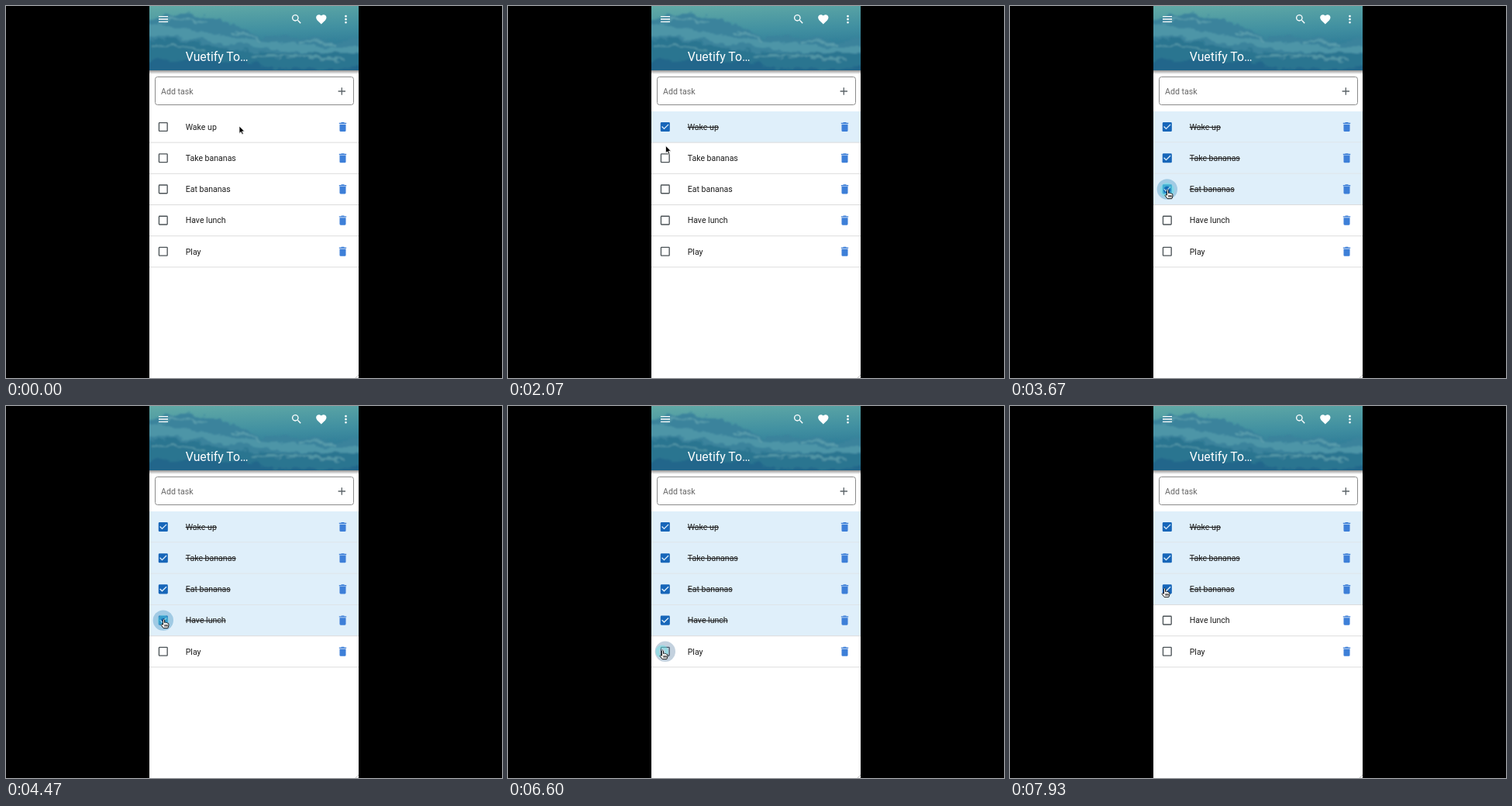
Recreate the animation shown at these times as an HTML page. Size 640 by 480 pixels, loop 8 s.

```html
<!DOCTYPE html>
<html lang="en">
<head>
<meta charset="utf-8">
<title>Todo list</title>
<style>
html, body { margin: 0; width: 100%; height: 100%; overflow: hidden; background: #000; }
svg { display: block; width: 100vw; height: 100vh; }
text { font-family: Roboto, Arial, sans-serif; }
</style>
</head>
<body>
<svg viewBox="0 0 640 480">
  <defs>
    <linearGradient id="sky" x1="0" y1="0" x2="0.15" y2="1">
      <stop offset="0" stop-color="#62aaa6"/>
      <stop offset=".45" stop-color="#4190a1"/>
      <stop offset="1" stop-color="#216a8f"/>
    </linearGradient>
    <linearGradient id="drop" x1="0" y1="0" x2="0" y2="1">
      <stop offset="0" stop-color="#000" stop-opacity=".42"/>
      <stop offset="1" stop-color="#000" stop-opacity="0"/>
    </linearGradient>
    <filter id="cloud" x="-10%" y="-30%" width="120%" height="160%">
      <feTurbulence type="fractalNoise" baseFrequency=".05 .09" numOctaves="3" seed="7"/>
      <feDisplacementMap in="SourceGraphic" scale="14" xChannelSelector="R" yChannelSelector="G"/>
      <feGaussianBlur stdDeviation="1.1"/>
    </filter>
    <clipPath id="head"><rect x="185" width="270" height="83"/></clipPath>
    <clipPath id="page"><rect x="185" width="270" height="480"/></clipPath>
  </defs>
  <rect width="640" height="480"/>
  <rect x="185" width="270" height="480" fill="#fff"/>
  <rect x="185" y="83" width="270" height="5" fill="url(#drop)"/>
  <g clip-path="url(#head)">
    <rect x="185" width="270" height="83" fill="url(#sky)"/>
    <g filter="url(#cloud)">
      <path d="M170 22Q200 8 216 15Q232 4 248 14Q272 10 288 24Q312 28 330 42Q352 36 372 44Q400 34 422 46L470 42V100H170Z" fill="#3a839c"/>
      <path d="M170 30Q205 21 232 29T300 41T352 47T410 52T470 50V60Q400 64 340 55T240 42T170 40Z" fill="#5a9fae" opacity=".65"/>
      <path d="M170 46Q210 38 252 48T340 60T470 62V100H170Z" fill="#28728f" opacity=".85"/>
      <path d="M196 23Q222 14 258 21M292 33Q316 36 330 45M378 48Q402 40 428 50M190 53Q225 48 256 57M318 66Q366 60 440 70" fill="none" stroke="#79b4ba" stroke-width="2.5" opacity=".5"/>
      <path d="M170 74Q240 62 320 76T470 74V100H170Z" fill="#1c6289" opacity=".7"/>
    </g>
  </g>
  <text x="231.8" y="70.6" font-size="15.8" fill="#fff">Vuetify To…</text>
  <g id="bar" fill="#fff"></g>
  <rect id="field" x="192.5" y="91.5" width="256" height="36" rx="3" fill="none"/>
  <rect id="notch" x="198" y="90" height="4" fill="#fff"/>
  <text id="label">Add task</text>
  <rect id="caret" x="200" y="103.5" width="1" height="13" fill="#1867a8"/>
  <g id="plus"></g>
  <g id="list" clip-path="url(#page)"></g>
  <g clip-path="url(#page)">
    <circle id="ripple" cx="202.8" r="13.2"/>
    <circle id="ring" fill="none" stroke="#68e4e8" stroke-width="4.6"/>
  </g>
  <path d="M451 480L455 476M453.5 480L455 478.5" stroke="#aaa" stroke-width=".7"/>
  <g id="pointer">
    <path id="arrow" d="M0 0V9.4L2.2 7.4L3.7 10.8L5.3 10.1L3.8 6.8H6.8Z" fill="#000" stroke="#fff" stroke-width=".7"/>
    <path id="hand" d="M-1 1Q0-.9 1 1V4.6Q2.2 3.5 2.9 4.8Q4.2 4 4.8 5.3Q6.4 4.8 6.4 6.6V8.6L5.3 11.6H-.4L-3.4 7.6Q-3.2 5.7-1 7.2ZM1.3 7V9.8M3 7V9.8M4.7 7V9.8" fill="#fff" stroke="#000" stroke-width=".9" stroke-linejoin="round"/>
    <path id="beam" d="M-2-5Q0-5 0-4Q0-5 2-5M0-4V5M-2 6Q0 6 0 5Q0 6 2 6" fill="none" stroke="#222" stroke-width=".9"/>
  </g>
</svg>
<script>
const LOOP = 8000;
const $ = id => document.getElementById(id);
const ICON = {
  menu: "M3 6H21V8H3ZM3 11H21V13H3ZM3 16H21V18H3Z",
  search: "M9.5 3A6.5 6.5 0 0 1 16 9.5C16 11.1 15.4 12.6 14.4 13.7L14.7 14H15.5L20.5 19L19 20.5L14 15.5V14.7L13.7 14.4A6.5 6.5 0 1 1 9.5 3M9.5 5A4.5 4.5 0 1 0 9.5 14A4.5 4.5 0 1 0 9.5 5",
  heart: "M12 21.3L10.6 20C5.4 15.4 2 12.3 2 8.5C2 5.4 4.4 3 7.5 3C9.2 3 10.9 3.8 12 5.1C13.1 3.8 14.8 3 16.5 3C19.6 3 22 5.4 22 8.5C22 12.3 18.6 15.4 13.4 20Z",
  dots: "M12 4A2 2 0 0 1 12 8A2 2 0 0 1 12 4M12 10A2 2 0 0 1 12 14A2 2 0 0 1 12 10M12 16A2 2 0 0 1 12 20A2 2 0 0 1 12 16",
  plus: "M19 13H13V19H11V13H5V11H11V5H13V11H19Z",
  trash: "M19 4H15.5L14.5 3H9.5L8.5 4H5V6H19ZM6 19A2 2 0 0 0 8 21H16A2 2 0 0 0 18 19V7H6Z",
  box: "M19 3H5A2 2 0 0 0 3 5V19A2 2 0 0 0 5 21H19A2 2 0 0 0 21 19V5A2 2 0 0 0 19 3M19 5V19H5V5Z",
  checked: "M10 17L5 12L6.4 10.6L10 14.2L17.6 6.6L19 8M19 3H5A2 2 0 0 0 3 5V19A2 2 0 0 0 5 21H19A2 2 0 0 0 21 19V5A2 2 0 0 0 19 3Z"
};
const TASKS = ["Wake up", "Take bananas", "Eat bananas", "Have lunch", "Play"];
const rowY = i => 156 + i * 40.2;

// Mouse presses: row, down, up
const CLICKS = [
  [0, 1450, 1725], [1, 2380, 2735], [2, 3180, 3600], [3, 4180, 4420],
  [4, 5040, 5330], [4, 6350, 6540], [3, 7020, 7270]
];
const FOCUS = 870, BLUR = 1450;

// Pointer stops: time, x, y
const PATH = [
  [70, 301, 155], [530, 296, 111], [1000, 296, 111], [1380, 203.5, 163.5],
  [1820, 203.5, 163.5], [2330, 203.5, 198], [2860, 203.5, 198],
  [3180, 203.5, 237], [3720, 203.5, 237], [4150, 203.5, 275],
  [4550, 203.5, 275], [5000, 201, 314.5], [5340, 201, 314.5],
  [5470, 207, 371], [6000, 207, 371], [6320, 199.5, 315],
  [6840, 199.5, 315], [7040, 199.5, 275], [7360, 199.5, 275],
  [7860, 199.5, 235]
];

const clamp = v => Math.max(0, Math.min(1, v));
const span = (t, a, b) => clamp((t - a) / (b - a));
const ease = u => u * u * (3 - 2 * u);
const mix = (a, b, u) => a + (b - a) * u;
const set = (el, attrs) => { for (const k in attrs) el.setAttribute(k, attrs[k]); };
const show = (el, on) => set(el, { visibility: on ? "visible" : "hidden" });
const icon = (name, x, y, extra = "") =>
  `<path d="${ICON[name]}" transform="translate(${x} ${y}) scale(.67) translate(-12 -12)" ${extra}/>`;

$("bar").innerHTML = icon("menu", 203, 17) + icon("search", 375, 17) +
  icon("heart", 406.8, 17.2) + icon("dots", 438.5, 17.2);
$("plus").innerHTML = icon("plus", 433.3, 110);

const rows = TASKS.map((name, i) => {
  const g = document.createElementNS("http://www.w3.org/2000/svg", "g"), y = rowY(i);
  g.innerHTML = `<rect x="185" y="${y - 20}" width="270" height="40.2" fill="#dfeffa"/>
    <rect x="185" y="${y + 19.6}" width="270" height="1" fill="#dcdcdc"/>
    ${icon("box", 202.8, y, 'fill="#4c5357" fill-rule="evenodd"')}
    ${icon("checked", 202.8, y, 'fill="#1766b9" fill-rule="evenodd"')}
    <text x="231.7" y="${y + 3.8}" font-size="10.55" fill="#1c1c1c">${name}</text>
    ${icon("trash", 434.5, y, 'fill="#3d7fd8"')}`;
  $("list").append(g);
  const [bg, , box, check, text] = g.children;
  return { bg, box, check, text };
});

function pointerAt(t) {
  const i = PATH.findIndex(p => p[0] > t);
  if (i === 0) return PATH[0].slice(1);
  if (i < 0) return PATH[PATH.length - 1].slice(1);
  const a = PATH[i - 1], b = PATH[i], u = ease(span(t, a[0], b[0]));
  return [mix(a[1], b[1], u), mix(a[2], b[2], u)];
}

function drawField(t) {
  const on = t >= FOCUS && t < BLUR;
  const lift = ease(span(t, FOCUS, FOCUS + 250)) - ease(span(t, BLUR, BLUR + 250));
  set($("field"), { stroke: on ? "#1f6a9c" : "#8b8b8b", "stroke-width": on ? 1.8 : 1 });
  set($("notch"), { width: 36 * lift });
  set($("label"), {
    x: 200, y: mix(113.8, 95.2, lift), "font-size": mix(10.6, 7.95, lift),
    fill: on ? "#1f6a9c" : "#666"
  });
  set($("plus"), { fill: on ? "#1f6a9c" : "#5c6468" });
  show($("caret"), on && t < FOCUS + 520);
}

function drawRows(t) {
  rows.forEach((r, i) => {
    const done = CLICKS.filter(c => c[0] === i && t >= c[2]).length % 2 === 1;
    show(r.bg, done);
    show(r.check, done);
    show(r.box, !done);
    set(r.text, { "text-decoration": done ? "line-through" : "none" });
    r.done = done;
  });
}

function drawPress(t) {
  const press = CLICKS.find(c => t >= c[1] && t < c[2] + 400);
  show($("ripple"), press);
  show($("ring"), press && t >= press[2]);
  if (!press) return;
  const [row, down, up] = press;
  set($("ripple"), {
    cy: rowY(row), r: 13.2 * ease(span(t, down, down + 220)),
    fill: rows[row].done ? "#1478b4" : "#3c6c96",
    opacity: .31 * (1 - span(t, up + 70, up + 200))
  });
  const u = span(t, up, up + 300), [x, y] = pointerAt(up);
  set($("ring"), {
    cx: x - .8, cy: mix(y + 2, rowY(row), .6),
    r: 19 * Math.sin(u * Math.PI / 2), opacity: .8 * Math.sin(u * Math.PI)
  });
}

function drawPointer(t) {
  const [x, y] = pointerAt(t);
  const hand = Math.abs(x - 203) < 12 &&
    TASKS.some((_, i) => Math.abs(y - rowY(i)) < 12);
  const beam = x > 193 && x < 424 && y > 91 && y < 128;
  set($("pointer"), { transform: `translate(${x} ${y})` });
  show($("hand"), hand);
  show($("beam"), beam);
  show($("arrow"), !hand && !beam);
}

function draw(t) {
  drawField(t);
  drawRows(t);
  drawPress(t);
  drawPointer(t);
}

const start = performance.now();
function tick() {
  draw((performance.now() - start) % LOOP);
  requestAnimationFrame(tick);
}
tick();
</script>
</body>
</html>
```
